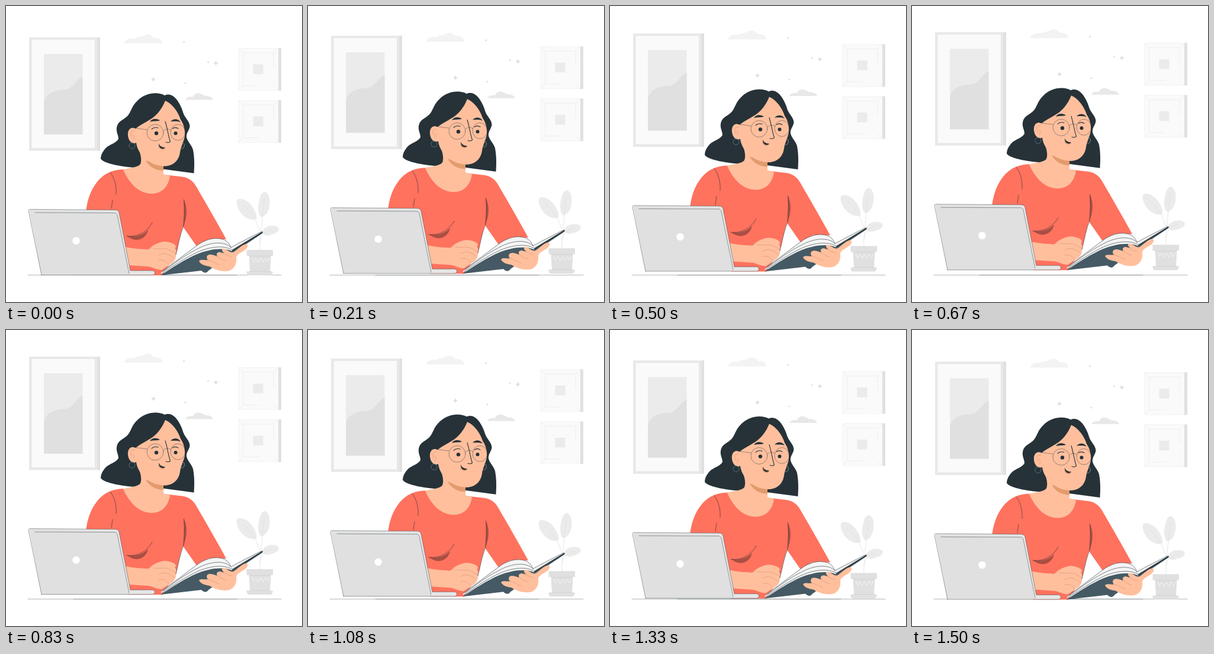
These frames come from a looping animation (500x500 px, 1540 ms). An HTML page:

```html
<!DOCTYPE html>
<html lang="en">
<head>
<meta charset="utf-8">
<title>Reading at the desk</title>
<style>
  html, body { margin: 0; width: 100%; height: 100%; overflow: hidden; background: #fff; }
  svg { display: block; width: 100%; height: 100%; }
  .ink { fill: none; stroke: #263238; stroke-width: .6; stroke-linecap: round; stroke-linejoin: round; }
  .fine { stroke-width: .45; }
  .bold { stroke-width: 1.1; }
  .crease { fill: none; stroke: #e39a78; stroke-width: .8; stroke-linecap: round; }
  .skin { fill: #ffbf9d; }
  .tan { fill: #e39b6d; }
  .dark { fill: #263238; }
  .red { fill: #ff725e; }
  .shade { fill: #a84e43; }
</style>
</head>
<body>
<svg viewBox="0 0 500 500">
  <defs>
    <path id="spark" d="M0-4.5Q.9-.9 4.5 0Q.9.9 0 4.5Q-.9.9-4.5 0Q-.9-.9 0-4.5Z" fill="#e0e0e0"/>
    <g id="smallFrame">
      <path d="M392.5 71H461V143H392.5Z" fill="#f0f0f0"/>
      <path d="M393.2 71.7H460V142.3H393.2Z" fill="#fafafa"/>
      <path d="M460 71H465V143H460Z" fill="#e0e0e0"/>
      <path d="M393 71.5L400.5 79H452L460 71.5M400.5 79V134.5L393 142.5M400.5 134.5H427M452 134.5L460 142.5M452 79V104" fill="none" stroke="#e8e8e8" stroke-width=".7"/>
      <path d="M417.5 98.5H434.5V115H417.5Z" fill="#ebebeb"/>
    </g>
  </defs>

  <path class="ink" d="M37 454.5H465M114 454.5H390" style="stroke-width:.35"/>

  <g id="scene">
    <!-- wall -->
    <path d="M39 53H159V244.5H39Z" fill="#e8e8e8"/>
    <path d="M154.5 53H159V244.5H154.5Z" fill="#e0e0e0"/>
    <path d="M43.5 57H150V240H43.5Z" fill="#fafafa"/>
    <path d="M64 81H129.5V217H64Z" fill="#ebebeb"/>
    <path d="M64 162C69 146 83 142 98 141.5C114 141 117 124 129.5 119V217H64Z" fill="#e0e0e0"/>
    <use href="#smallFrame"/>
    <use href="#smallFrame" y="88"/>
    <path d="M199.5 63C201 58 207 54 212 55C218 56 220 52 227 52C231 52 233 48 239 48C246 48 248 53 251 54C259 53 264 57 264 63Z" fill="#f3f3f3"/>
    <path d="M303 158.5C305 154 309 153 316 153.5C318 148 324 146 328 148C332 148 334 152 339 152C345 152 349 155 350 158.5Z" fill="#e8e8e8"/>
    <use href="#spark" x="249" y="124"/>
    <use href="#spark" x="354.5" y="96.5"/>
    <g fill="#e0e0e0">
      <circle cx="300.5" cy="60.5" r="1.6"/><circle cx="341.5" cy="94.5" r="1.5"/><circle cx="303" cy="130.5" r="1.5"/>
    </g>

    <!-- plant -->
    <g fill="#ebebeb">
      <path d="M391 327C397 323 410 329 417 340C423 349 424 357 423 360C414 364 401 357 395 347C390 339 388 330 391 327Z"/>
      <path d="M437 314C444 315 447 327 445 338C443 350 436 357 430 356C425 350 425 338 428 327C430 319 433 314 437 314Z"/>
      <path d="M432 381C436 374 443 371 450 371C457 371 461 374 461 377C460 382 454 385 448 386C442 389 435 389 432 381Z"/>
    </g>
    <path d="M429 412C428 395 432 370 436 325M429 383C425 365 415 348 400 336M429 400C430 388 438 380 450 378" fill="none" stroke="#e0e0e0" stroke-width=".8"/>
    <path d="M406.5 412H451V422H447.5L446 448H450L451 450L448 455H409L406 450L407 448H412L410.5 422H406.5Z" fill="#e0e0e0"/>
    <path d="M411 422.5H447M412 448H446" stroke="#d0d0d0" stroke-width=".8"/>
    <path d="M415 425L418 432L422 426L426 433L430 426L434 433L438 426L442 432L445 425" fill="none" stroke="#f5f5f5"/>

    <!-- hair and torso -->
    <path class="dark" d="M268 151C256 144 234 147 222 160C212 169 211 180 205 186C199 192 190 194 187.500 203C185 212 190 218 190 224C187 232 172 234 166 243C162 248 160 253 160 258C166 267 198 272 229 274L265 275.500L317.500 282.500C318 273 319 259 316 243C314 235 307 230 305 222C304 214 310 210 310.500 203C310 194 302 189 299.500 181C295 165 283 144 268 151Z"/>
    <path class="red" d="M200 276C181 276 166 282 154 297C143 311 137 328 135 348L205 455H264L287 420C291 405 293 390 299 373L322 406L342 394L372 394C354 361 337 332 322 306C316 295 308 290 298 288.500L276 286Z"/>
    <path class="skin" d="M219 226C225 243 231 258 227 267C223 273 208 273 198 276.500C207 297 223 317 246 317C263 317 274 306 277 287L266 284V262Z"/>
    <path class="tan" d="M236 261C243 273 254 278 266 278V268Z"/>
    <path class="shade" d="M300.500 327C307 340 306 358 299.500 373C302 356 301 342 300.500 327ZM204 388.500C219 391 231 387 240 378C238 389 228 396 219 395C212 394 208 391 204 388.500Z"/>
    <path class="ink" d="M176 281C183 290 187 303 186 318M180 328L178 342M204 388.500C222 391 238 382 247 366M300.500 327C302 342 301 358 299.500 373C293 390 291 405 287 420"/>

    <!-- face -->
    <path class="skin" d="M269 160C264 173 254 186 243 192C234 198 226 201 219 207C211 203 205 209 206 219C207 229 214 234 220 231C222 248 238 267 262 270C279 273 292 263 294 247C295 239 300 230 302 220C303 209 300 199 295 192C291 179 281 165 269 160Z"/>
    <path class="dark" d="M243 195.500C246 190 255 189 260 193.500C255 195 249 194 243 195.500ZM278 195C283 189.500 291 190 295 196.500C289 194 284 195 278 195Z"/>
    <path class="ink bold" d="M246 208C249 205 254 205 257 206M281 207C284 205 288 205 291 207"/>
    <circle class="dark" cx="254" cy="215" r="3.2"/>
    <circle class="dark" cx="286.5" cy="215" r="3"/>
    <g class="ink fine">
      <circle cx="252" cy="214" r="14"/>
      <ellipse cx="290.5" cy="213.500" rx="12.500" ry="13.500"/>
      <path d="M266 211C270 207 275 207 278.500 210M238 209L216 206"/>
    </g>
    <path class="ink bold" d="M269 195C273 208 274 219 277.500 229C276 231 273 231 270 230"/>
    <path class="tan" d="M257 237C259 243 265 244 269 241L260 236Z"/>
    <path class="dark" d="M258 232C259 236 263 239 269 239C265 244 257 240 258 232Z"/>
    <path class="crease" d="M217 211C210 210 209 216 213 222M214 218C218 219 217 224 214 226"/>
    <circle cx="213" cy="236" r="5" fill="none" stroke="#607d8b" stroke-width=".8"/>
    <path d="M297 230C303 231 303 241 296 241" fill="none" stroke="#90a4ae" stroke-width=".8"/>

    <!-- arm resting on the desk -->
    <path class="skin" d="M202 407C216 410 230 411 241 411C247 404 255 401 262 399C270 396 281 400 285 403C288 406 287 408 285 409C289 413 287 418 286 420C289 423 285 431 281 434L263 446C252 445 247 440 238 440L208 438Z"/>
    <path class="crease" d="M249 410C260 411 268 409 274 411C279 414 283 415 287 418M258 421C267 415 275 419 284 426M258 430C265 427 271 431 275 437M238 412L246 408"/>

    <!-- book -->
    <path d="M261 455L325 413L357 403L382 413L433.500 381.500L433 384L394 410L342 447C339 452 334 451 330 447Z" fill="#455a64"/>
    <path d="M262 450L322 405C335 395 350 391 361 393C371 394 377 400 380 408C396 399 414 390 432 381L382 414C366 407 342 411 323 419C304 427 281 442 262 453Z" fill="#f5f5f5"/>
    <path class="ink" d="M263 449L322 405C335 395 350 391 361 393C371 394 377 400 380 408C396 399 414 390 432 381M266 448C284 435 302 421 324 410C344 399 369 396 380 408M263 452C281 440 303 425 325 415C347 406 368 404 382 412L433 381.500"/>
    <path d="M382 413.500L433.500 382" stroke="#263238" stroke-width="1.5"/>

    <!-- hand holding the book -->
    <path class="skin" d="M326 431C329 427 336 430 341 429C337 424 340 420 344 420C348 419 353 422 357 423C354 418 358 415 362 416L369 418C363 413 364 409 369 410C375 412 378 417 384 416C391 412 398 403 406 402C410 404 408 408 405 411C399 416 391 418 389 424C390 433 388 442 378 447C367 450 353 446 344 440C337 439 329 437 326 431Z"/>
    <path class="crease" d="M341 429C349 431 355 435 360 437M357 423C362 427 367 429 371 430M369 418C374 422 378 423 381 423"/>

    <!-- laptop -->
    <path d="M40 343.500L184 344.500C188 344.500 190 346 191 349L210 447H247C253 447 253 454.500 247 454.500H60Z" fill="#e6e6e6"/>
    <path d="M39 345L184 348C186 348 187 350 188 353L208 454.500H60Z" fill="#e0e0e0"/>
    <path class="ink fine" d="M60 454.500L38 346C38 344 39 343.500 41 343.500L184 344.500C188 344.500 190 346 191 349L210 447H247C253 447 253 454.500 247 454.500H60M49 349L184 349.500C186 350 187 351 188 353L208 452"/>
    <circle cx="118.5" cy="396.5" r="6.3" fill="#fff"/>
  </g>
</svg>
<script>
  const LOOP = 1540, RISE = 10, LEAD = 50, REST = .65;
  const scene = document.getElementById('scene');

  // Linear float: up for half the loop, down for the other half.
  function draw() {
    const phase = (performance.now() + LEAD) % LOOP / LOOP;
    const lift = RISE * (1 - Math.abs(1 - 2 * phase));
    scene.setAttribute('transform', `translate(0 ${(REST - lift).toFixed(2)})`);
    requestAnimationFrame(draw);
  }
  draw();
</script>
</body>
</html>
```
